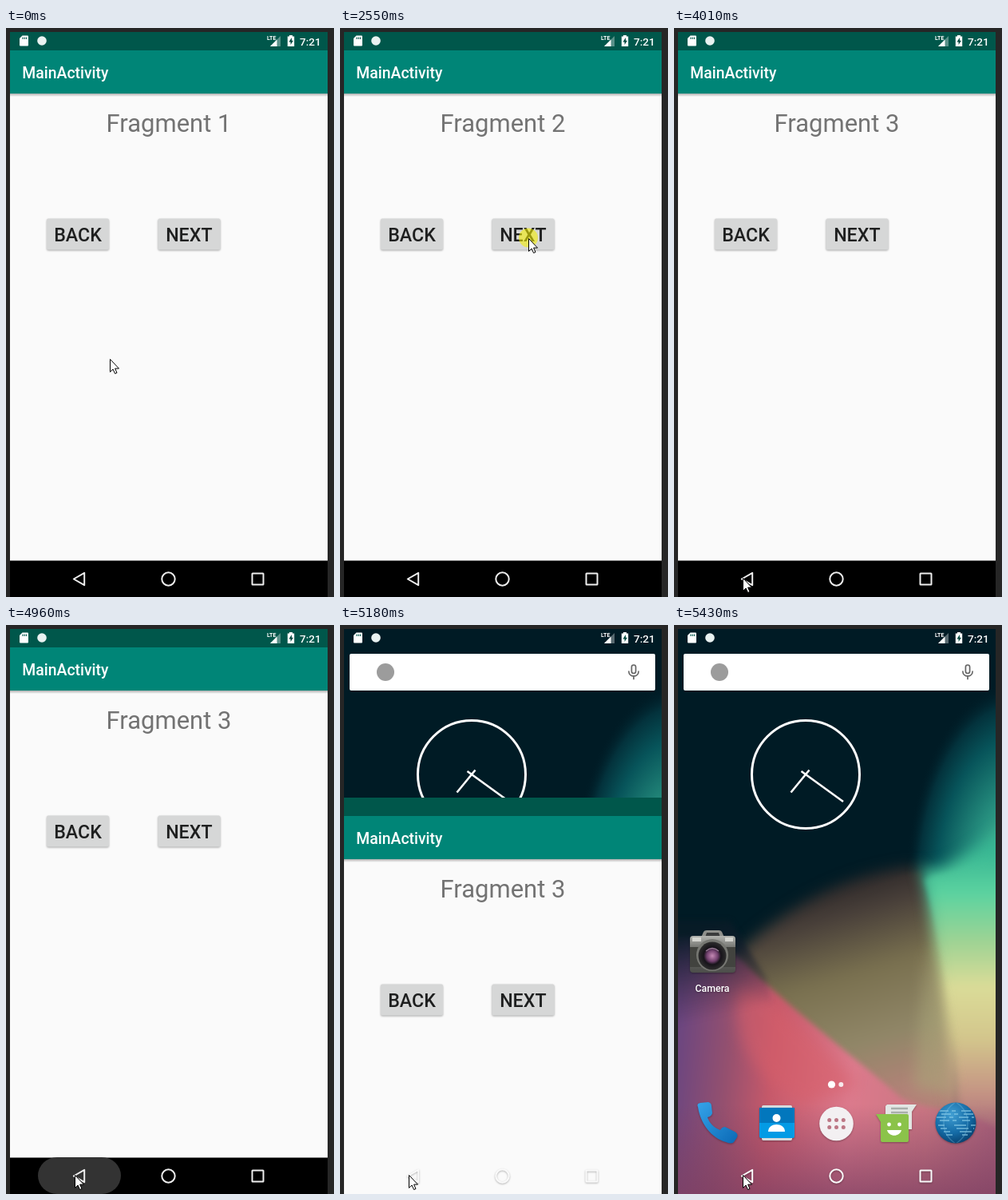
These frames come from a looping animation (411 by 712 pixels, 6.58 s). An HTML page:

```html
<!DOCTYPE html>
<html lang="en">
<head>
<meta charset="utf-8">
<title>Fragment navigation</title>
<style>
  html, body { margin: 0; width: 100%; height: 100%; overflow: hidden; background: #262626; }
  svg { display: block; width: 411px; height: 712px; }
  text { font-family: Roboto, sans-serif; }
  .medium { font-weight: 500; }
  .button rect { fill: #d6d7d7; filter: drop-shadow(0 1px 1px rgba(0, 0, 0, .32)); }
  .button text { font-size: 23.2px; font-weight: 500; fill: #1e1f1f; text-anchor: middle; }
  .shade { filter: drop-shadow(0 1px 1px rgba(0, 0, 0, .3)); }
  .soft { filter: blur(3px); }
  .softer { filter: blur(9px); }
</style>
</head>
<body>
<svg viewBox="0 0 411 712" xmlns="http://www.w3.org/2000/svg">
  <defs>
    <clipPath id="screen"><rect x="5" y="5" width="398" height="707"/></clipPath>
    <clipPath id="nextClip"><rect x="191" y="239" width="77" height="39" rx="2"/></clipPath>
    <clipPath id="globeClip"><circle cx="353" cy="623" r="25"/></clipPath>
    <linearGradient id="barShadow" x2="0" y2="1">
      <stop stop-color="#000" stop-opacity=".3"/><stop offset="1" stop-color="#000" stop-opacity="0"/>
    </linearGradient>
    <radialGradient id="teal" gradientUnits="userSpaceOnUse" r="1" cx="0" cy="0" gradientTransform="translate(430 325) scale(140 255)">
      <stop stop-color="#5fd9a6"/><stop offset=".42" stop-color="#27907f"/>
      <stop offset=".72" stop-color="#07545a"/><stop offset=".88" stop-color="#03323c"/>
      <stop offset="1" stop-color="#001b25" stop-opacity="0"/>
    </radialGradient>
    <linearGradient id="hill" gradientUnits="userSpaceOnUse" x1="190" y1="310" x2="270" y2="590">
      <stop stop-color="#221f22"/><stop offset=".2" stop-color="#49403a"/>
      <stop offset=".45" stop-color="#79704f"/><stop offset=".75" stop-color="#918768"/>
      <stop offset="1" stop-color="#b38278"/>
    </linearGradient>
    <linearGradient id="right" gradientUnits="userSpaceOnUse" x1="0" y1="280" x2="0" y2="712">
      <stop stop-color="#36b592"/><stop offset=".13" stop-color="#5cd3a0"/>
      <stop offset=".27" stop-color="#9fd394"/><stop offset=".4" stop-color="#dbdc98"/>
      <stop offset=".55" stop-color="#d3c68c"/><stop offset=".7" stop-color="#c59684"/>
      <stop offset=".85" stop-color="#a7627a"/><stop offset="1" stop-color="#874866"/>
    </linearGradient>
    <linearGradient id="pink" gradientUnits="userSpaceOnUse" x1="0" y1="560" x2="403" y2="600">
      <stop stop-color="#6b4680"/><stop offset=".16" stop-color="#94506f"/>
      <stop offset=".3" stop-color="#c6596a"/><stop offset=".55" stop-color="#dc7a8c"/>
      <stop offset=".8" stop-color="#c97682"/><stop offset="1" stop-color="#a9627a"/>
    </linearGradient>
    <linearGradient id="dusk" gradientUnits="userSpaceOnUse" x1="30" y1="380" x2="55" y2="490">
      <stop stop-color="#071b26"/><stop offset="1" stop-color="#2c2038" stop-opacity="0"/>
    </linearGradient>
    <linearGradient id="low" x2="0" y2="1">
      <stop stop-color="#7d3f62" stop-opacity="0"/><stop offset="1" stop-color="#7d3f62" stop-opacity=".75"/>
    </linearGradient>
    <linearGradient id="metal" x2="0" y2="1">
      <stop stop-color="#b3b4b0"/><stop offset=".3" stop-color="#777874"/><stop offset="1" stop-color="#4c4d4a"/>
    </linearGradient>
    <radialGradient id="lens">
      <stop stop-color="#c58ab5"/><stop offset=".4" stop-color="#70406d"/>
      <stop offset=".62" stop-color="#17141a"/><stop offset="1" stop-color="#2d2d2d"/>
    </radialGradient>
    <linearGradient id="handset" x2="1" y2="1">
      <stop stop-color="#35a4ea"/><stop offset="1" stop-color="#0b69b5"/>
    </linearGradient>
    <radialGradient id="globe" cx=".4" cy=".3" r=".75">
      <stop stop-color="#419ed2"/><stop offset=".6" stop-color="#146ba6"/><stop offset="1" stop-color="#073e6b"/>
    </radialGradient>
  </defs>

  <rect width="411" height="712" fill="#262626"/>
  <g clip-path="url(#screen)">

    <g id="home">
      <rect width="411" height="712" fill="#001b25"/>
      <rect x="250" y="40" width="161" height="400" fill="url(#teal)"/>
      <path class="softer" fill="url(#hill)" d="M60 430C120 365 210 308 306 302L350 450V660H250Z"/>
      <path class="soft" fill="url(#hill)" d="M90 424C150 372 225 334 309 308L350 450V660H250Z" opacity=".75"/>
      <path class="softer" fill="url(#right)" d="M308 300C330 318 360 292 420 250V730H350C348 600 335 440 316 330Z"/>
      <path class="soft" fill="url(#right)" d="M314 318C345 310 380 300 420 290V640L362 590C352 500 336 400 314 318Z" opacity=".55"/>
      <path class="softer" fill="#a9a578" opacity=".6" d="M318 400L352 590L300 580Z"/>
      <path class="soft" fill="url(#pink)" d="M-5 385C35 390 75 405 95 430C155 488 220 535 285 592C325 612 365 600 420 640V730H-5Z"/>
      <path class="softer" fill="#d85f6a" opacity=".55" d="M80 455C110 450 160 500 230 575L160 600C110 570 70 530 80 455Z"/>
      <path class="soft" fill="url(#dusk)" d="M-5 370H70L115 440L130 500H-5Z"/>
      <rect x="5" y="600" width="398" height="112" fill="url(#low)"/>

      <rect x="12" y="36" width="383" height="46" rx="2" fill="#fff" class="shade"/>
      <circle cx="57" cy="59" r="11" fill="#9c9c9c"/>
      <g fill="none" stroke="#666" stroke-width="1.7">
        <rect x="365.4" y="50" width="5.2" height="10.5" rx="2.6"/>
        <path d="M361.8 57.5c0 8.6 12.4 8.6 12.4 0M368 64v4.2"/>
      </g>

      <g fill="none" stroke="#fff" stroke-width="3">
        <circle cx="165" cy="187" r="67.5"/>
        <path stroke-width="2.6" d="M169.5 181.5L146.5 209.5M159.5 183L212 221"/>
      </g>

      <g class="shade">
        <path d="M33 393L37 384Q38 382 41 382H56Q59 382 60 384L64 393Z" fill="#8f908c"/>
        <path d="M41 385H56L58 391H39Z" fill="#3a3b3c"/>
        <rect x="20" y="389" width="57" height="46" rx="4" fill="url(#metal)"/>
        <path d="M20 403H77V428H20Z" fill="#42433f"/>
        <path d="M23 391H34V396H23ZM64 391H74V396H64Z" fill="#d4d4cf"/>
        <circle cx="48" cy="413" r="20" fill="#777873"/>
        <circle cx="48" cy="414" r="17.5" fill="url(#lens)"/>
        <path d="M40 408Q48 401 56 408" fill="none" stroke="#d6b5d0" stroke-width="1.5" opacity=".6"/>
      </g>
      <text class="shade" x="48" y="458.5" font-size="12.4" text-anchor="middle" font-weight="500" fill="#fff">Camera</text>

      <circle cx="197.5" cy="575" r="4.6" fill="#fff"/>
      <circle cx="209.3" cy="575" r="3" fill="#f6e9ec"/>

      <path class="shade" fill="url(#handset)" d="M30 603Q28 599 33 598L43 597Q47 598 47 602L48 611Q47 615 42 616C44 623 50 629 58 632Q60 628 64 628L76 634Q81 637 79 641L75 647Q72 650 65 647C47 642 33 624 30 603Z"/>

      <g class="shade">
        <rect x="110" y="601" width="38" height="44" rx="2" fill="#d5dadd"/>
        <rect x="107" y="604" width="44" height="38" rx="2" fill="#039be5"/>
        <path d="M107 604H151V623H107Z" fill="#0277bd"/>
        <circle cx="128.5" cy="617" r="5" fill="#fff"/>
        <path d="M118 634C118 622 139 622 139 634Z" fill="#fff"/>
      </g>

      <circle class="shade" cx="203.5" cy="624" r="21.3" fill="#f3f0f2"/>
      <path stroke="#bd7785" stroke-width="5" stroke-linecap="round" stroke-dasharray="0 8.8" d="M194.7 619.5H213M194.7 628.5H213"/>

      <g class="shade">
        <path d="M267 600H304L298 609V631H265V602Z" fill="#e3e6e4"/>
        <path d="M272 605H293M272 610H293" stroke="#a9afab" stroke-width="2.5"/>
        <path d="M253 612H292Q294 612 294 614V645Q294 647 292 647H261Q259 647 259 645V622Z" fill="#8bc34a"/>
        <g fill="#fff">
          <circle cx="269.5" cy="625" r="2.4"/><circle cx="282.5" cy="625" r="2.4"/>
          <path d="M267 632H285C283 641 269 641 267 632Z"/>
        </g>
      </g>

      <g class="shade">
        <circle cx="353" cy="623" r="25.5" fill="url(#globe)"/>
        <g clip-path="url(#globeClip)" fill="none" stroke="#8fd0ec" stroke-width="1.4" opacity=".75">
          <path stroke-dasharray="12 4 5 7" d="M332 608H374M335 612H378M329 616H376M333 620H371"/>
          <path stroke-dasharray="8 12 15 6" d="M331 626H378M334 630H376M338 634H374M341 638H368"/>
          <path opacity=".4" d="M353 597C333 610 333 636 353 649C373 636 373 610 353 597"/>
        </g>
      </g>
    </g>

    <g id="app">
      <rect x="5" y="5" width="398" height="707" fill="#fafafa"/>
      <rect x="5" y="5" width="398" height="23" fill="#00574b"/>
      <rect x="5" y="28" width="398" height="54" fill="#008577"/>
      <rect x="5" y="82" width="398" height="4" fill="url(#barShadow)"/>
      <text class="medium" x="20.3" y="62.5" font-size="19.4" fill="#fff">MainActivity</text>
      <text id="label" x="204" y="130.3" font-size="31" fill="#737373" text-anchor="middle">Fragment 1</text>
      <g class="button"><rect x="51" y="238.5" width="78" height="39" rx="2"/><text x="90" y="267">BACK</text></g>
      <g class="button"><rect x="190.5" y="238.5" width="78" height="39" rx="2"/></g>
      <g clip-path="url(#nextClip)"><circle id="ripple" cx="236" cy="263" fill="#000"/></g>
      <g class="button"><text x="229.3" y="267">NEXT</text></g>
    </g>

    <g fill="#fff">
      <path d="M20.5 9.5H27Q28 9.5 28 10.5V21.5Q28 22.5 27 22.5H18Q17 22.5 17 21.5V13Z"/>
      <path d="M21 11.5V14M23.2 11.5V14M25.4 11.5V14" stroke="#00574b" stroke-width="1.1"/>
      <circle cx="45" cy="16" r="5.8" fill="#e9f2f1"/>
      <text x="327" y="15" font-size="7" font-weight="700">LTE</text>
      <path d="M344 10V23H331Z" opacity=".35"/>
      <path d="M339.5 14.5V23H331Z"/>
      <path d="M355 10.5V9H359V10.5H361.2V23H352.8V10.5Z"/>
      <path d="M358 12L354.5 17.5H356.6V21L360 15.7H358Z" fill="#00483f"/>
      <text class="medium" x="368" y="21.5" font-size="13.6">7:21</text>
    </g>

    <rect id="navBar" x="5" y="666.5" width="398" height="46" fill="#000"/>
    <rect id="pill" y="666" height="46" rx="24" fill="#333"/>
    <g id="navIcons" fill="none" stroke="#eee" stroke-width="2">
      <path d="M84.8 689.5L98.2 681.8V697.2Z" stroke-linejoin="round"/>
      <circle cx="203.5" cy="689.5" r="8.2"/>
      <rect x="308.5" y="682.5" width="14" height="14" rx=".5"/>
    </g>
  </g>

  <g id="pointer">
    <circle id="glow" r="12" cy="-.5" fill="#f4ef00" opacity=".58"/>
    <path d="M.5 .5V16.4L4.1 13L6.6 18.5L9 17.5L6.6 12.1H11.5Z" fill="#fff" stroke="#000"/>
  </g>
</svg>

<script>
  const LOOP = 6580;
  const byId = id => document.getElementById(id);
  const [app, label, ripple, navBar, navIcons, pill, pointer, glow] =
    ['app', 'label', 'ripple', 'navBar', 'navIcons', 'pill', 'pointer', 'glow'].map(byId);

  // Nine eased pointer positions between two points: [time, x, y].
  function sweep(start, end, from, to) {
    return Array.from({ length: 9 }, (_, i) => {
      const p = (i + 1) / 9;
      const k = p * p * (3 - 2 * p);
      const mix = n => Math.round(from[n] + (to[n] - from[n]) * k);
      return [Math.round((start + (end - start) * i / 8) / 10) * 10, mix(0), mix(1)];
    });
  }

  const pointerSteps = [
    [0, 130, 414],
    ...sweep(380, 1010, [130, 414], [234, 266]),
    [1080, 236, 263],
    ...sweep(3090, 3700, [236, 263], [86, 683]),
    [3780, 86, 685], [3860, 86, 687], [4010, 86, 688]
  ];
  const glowSteps = [[0, 0], [1540, 1], [1690, 0], [2550, 1], [2710, 0], [4710, 1], [4880, 0]];
  const labelSteps = [[0, 1], [1690, 2], [2710, 3]];
  // Button ripple: radius, opacity.
  const rippleSteps = [[0, 0, 0], [1620, 34, .1], [1690, 60, .07], [1770, 0, 0], [2630, 40, .1], [2710, 0, 0]];
  // Navigation ripple: width, opacity.
  const pillSteps = [[0, 0, 0], [4790, 64, .6], [4880, 92, .85], [4960, 104, 1], [5120, 0, 0]];
  const slideSteps = [[0, 0], [5120, 60], [5180, 211], [5260, 440], [5340, 630], [5430, 720]];

  function at(steps, t) {
    let found = steps[0];
    for (const step of steps) if (step[0] <= t) found = step;
    return found.slice(1);
  }

  function render(t) {
    const [x, y] = at(pointerSteps, t);
    pointer.setAttribute('transform', `translate(${x} ${y})`);
    glow.style.display = at(glowSteps, t)[0] ? '' : 'none';

    const text = `Fragment ${at(labelSteps, t)[0]}`;
    if (label.textContent !== text) label.textContent = text;

    const [radius, rippleAlpha] = at(rippleSteps, t);
    ripple.setAttribute('r', radius);
    ripple.setAttribute('opacity', rippleAlpha);

    const [width, pillAlpha] = at(pillSteps, t);
    pill.setAttribute('x', 92 - width / 2);
    pill.setAttribute('width', width);
    pill.setAttribute('opacity', pillAlpha);

    const slide = at(slideSteps, t)[0];
    app.setAttribute('transform', `translate(0 ${slide})`);
    navBar.style.display = slide ? 'none' : '';
    navIcons.setAttribute('class', slide ? 'shade' : '');
    navIcons.setAttribute('stroke', slide ? '#fafafa' : '#eee');
  }

  const begin = performance.now();
  function tick() {
    render((performance.now() - begin) % LOOP);
    requestAnimationFrame(tick);
  }
  tick();
</script>
</body>
</html>
```
